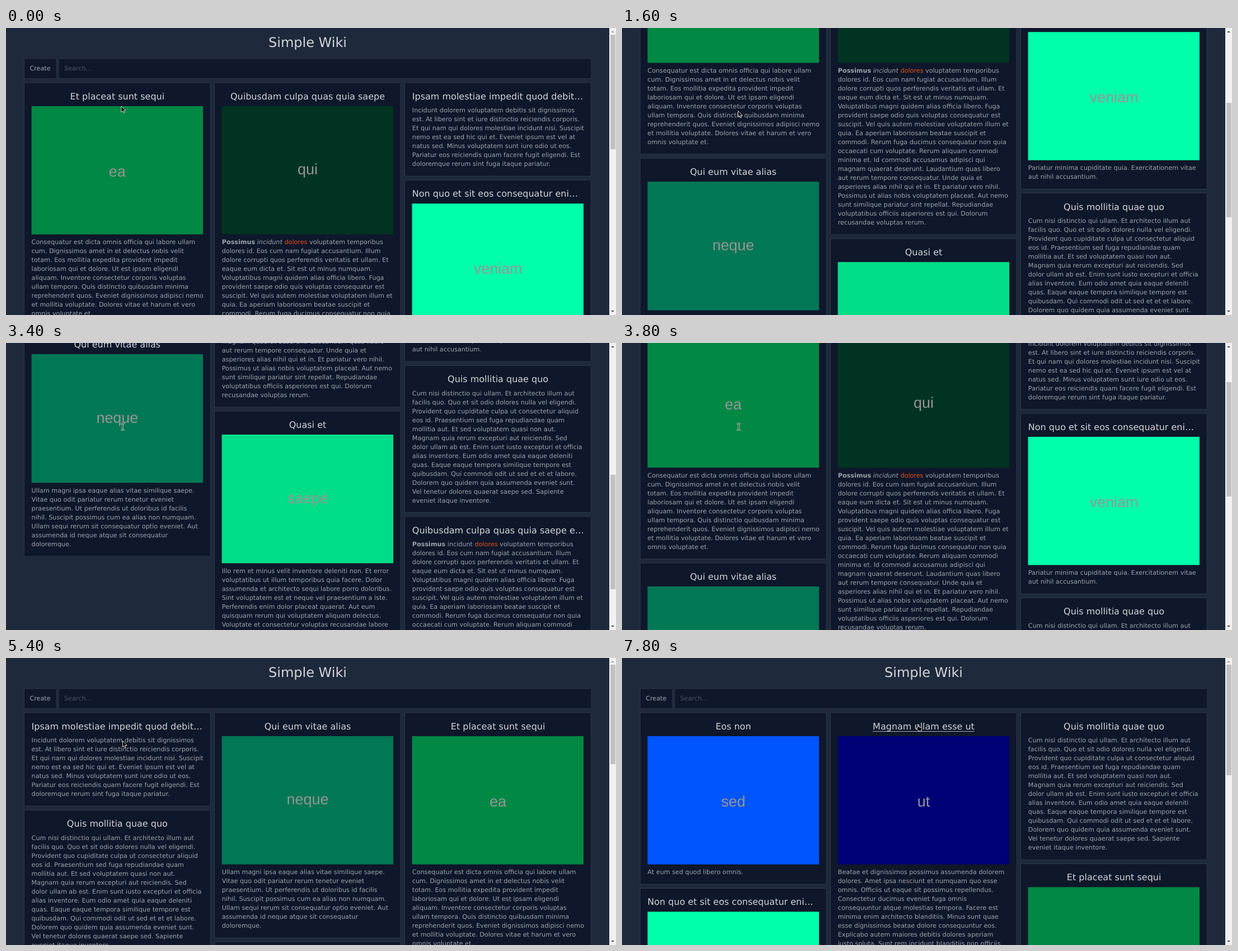
Recreate the animation shown at these times as an HTML page. Size 1090x514 px, loop 8 s.

```html
<!DOCTYPE html>
<html lang="en">
<head>
<meta charset="utf-8">
<title>Simple Wiki</title>
<style>
html, body { margin: 0; width: 100%; height: 100%; overflow: hidden; background: #1e293b; }
body { position: relative; }
/* the page is laid out at full size and shown at 80% */
#view {
  position: absolute; left: 0; top: 0; width: 1347.5px; height: 642.5px;
  transform: scale(.8); transform-origin: 0 0; color: #9ca3af;
  font: 14px/20px "DejaVu Sans", sans-serif;
  text-rendering: geometricPrecision;
}
#page { position: absolute; left: 0; top: 0; width: 100%; height: 1537px; }
h1, h2, p { margin: 0; font-weight: 400; white-space: pre; }
h1 {
  position: absolute; top: 16px; width: 100%;
  font-size: 30px; line-height: 36px; text-align: center; color: #d1d5db;
}
.box { background: #0f172a; border: 1px solid #334155; box-sizing: border-box; }
.bar { position: absolute; top: 68px; height: 46px; line-height: 44px; padding-left: 12px; }
.create { left: 40px; width: 73px; }
.search { left: 117px; width: 1190.5px; color: #4b5563; }
.scene { position: absolute; left: 40px; top: 122px; display: flex; gap: 8px; }
.col { width: 417.17px; }
.card { padding: 16px; margin-bottom: 8px; overflow: hidden; }
h2 {
  font-size: 20px; line-height: 28px; margin-bottom: 8px;
  text-align: center; color: #d1d5db;
}
h2.cut { text-align: left; }
h2.hover { text-decoration: underline 1px; text-underline-offset: 4px; text-decoration-skip-ink: none; }
.pic {
  height: 287.4px; margin-bottom: 8px; text-align: center; color: #969696;
  font: 33.7px/287.4px "Liberation Sans", Arial, sans-serif;
}
.pic span { position: relative; top: 3px; }
.pic .low { top: -.7px; }
.link { color: #e2531a; }
#scroll { position: absolute; left: 1078px; top: 0; width: 12px; height: 514px; background: #f1f1f1; }
#thumb { position: absolute; left: 1.5px; width: 9px; background: #c1c1c1; }
#scroll svg, #cursor { position: absolute; left: 0; top: 0; overflow: visible; }
</style>
</head>
<body>
<div id="view">
  <div id="page">
    <h1>Simple Wiki</h1>
    <div class="box bar create">Create</div>
    <div class="box bar search">Search...</div>
  </div>
</div>
<div id="scroll">
  <div id="thumb"></div>
  <svg width="12" height="514">
    <path id="up" d="M3 8L6 5L9 8Z"/>
    <path d="M3 506L6 509L9 506Z" fill="#505050"/>
  </svg>
</div>
<svg id="cursor" width="16" height="16">
  <path id="arrow" d="M.5 .5V11.3L3 9.1L4.7 12.8L6.3 12.1L4.7 8.5H8.2Z" stroke="#fff" stroke-width=".8"/>
  <g id="beam" fill="none">
    <path d="M-3 -5.5H-1L0 -4.7L1 -5.5H3M0 -4.7V4.7M-3 5.5H-1L0 4.7L1 5.5H3" stroke="#fff" stroke-width="2.2"/>
    <path d="M-2.5 -5.5H-1L0 -4.7L1 -5.5H2.5M0 -4.7V4.7M-2.5 5.5H-1L0 4.7L1 5.5H2.5" stroke="#000" stroke-width=".9"/>
  </g>
  <path id="hand" d="M3 8V1.5Q4 0 5 1.5V5.3L10 6.6Q11 7 10.8 8.2L10 11.5V13H4.5V11.8L1 8.6Q1.4 7.2 3 8Z" stroke="#fff" stroke-width=".9"/>
</svg>
<script>
const $ = id => document.getElementById(id);

const possimus = first => `<b>Possimus</b> ${first} <span class="link">dolores</span> voluptatem temporibus
dolores id. Eos cum nam fugiat accusantium. Illum
dolore corrupti quos perferendis veritatis et ullam. Et
eaque eum dicta et. Sit est ut minus numquam.
Voluptatibus magni quidem alias officia libero. Fuga
provident saepe odio quis voluptas consequatur est
suscipit. Vel quis autem molestiae voluptatem illum et
quia. Ea aperiam laboriosam beatae suscipit et
commodi. Rerum fuga ducimus consequatur non quia
occaecati cum voluptate. Rerum aliquam commodi
minima et. Id commodi accusamus adipisci qui
magnam quaerat deserunt. Laudantium quas libero
aut rerum tempore consequatur. Unde quia et
asperiores alias nihil qui et in. Et pariatur vero nihil.
Possimus ut alias nobis voluptatem placeat. Aut nemo
sunt similique pariatur sint repellat. Repudiandae
voluptatibus officiis asperiores est qui. Dolorum
recusandae voluptas rerum.`;

// title, text, picture word, picture colour
const cards = {
  et: ["Et placeat sunt sequi", `Consequatur est dicta omnis officia qui labore ullam
cum. Dignissimos amet in et delectus nobis velit
totam. Eos mollitia expedita provident impedit
laboriosam qui et dolore. Ut est ipsam eligendi
aliquam. Inventore consectetur corporis voluptas
ullam tempora. Quis distinctio quibusdam minima
reprehenderit quos. Eveniet dignissimos adipisci nemo
et mollitia voluptate. Dolores vitae et harum et vero
omnis voluptate et.`, "ea", "#008844"],
  culpa: ["Quibusdam culpa quas quia saepe", possimus("<i>incidunt</i>"), "qui", "#003322"],
  culpaLong: ["Quibusdam culpa quas quia saepe e…", possimus("incidunt")],
  ipsam: ["Ipsam molestiae impedit quod debit…", `Incidunt dolorem voluptatem debitis sit dignissimos
est. At libero sint et iure distinctio reiciendis corporis.
Et qui nam qui dolores molestiae incidunt nisi. Suscipit
nemo est ea sed hic qui et. Eveniet ipsum est vel at
natus sed. Minus voluptatem sunt iure odio ut eos.
Pariatur eos reiciendis quam facere fugit eligendi. Est
doloremque rerum sint fuga itaque pariatur.`],
  non: ["Non quo et sit eos consequatur eni…", `Pariatur minima cupiditate quia. Exercitationem vitae
aut nihil accusantium.`, "veniam", "#00ffaa"],
  quis: ["Quis mollitia quae quo", `Cum nisi distinctio qui ullam. Et architecto illum aut
facilis quo. Quo et sit odio dolores nulla vel eligendi.
Provident quo cupiditate culpa ut consectetur aliquid
eos id. Praesentium sed fuga repudiandae quam
mollitia aut. Et sed voluptatem quasi non aut.
Magnam quia rerum excepturi aut reiciendis. Sed
dolor ullam ab est. Enim sunt iusto excepturi et officia
alias inventore. Eum odio amet quia eaque deleniti
quas. Eaque eaque tempora similique tempore est
quibusdam. Qui commodi odit ut sed et et et labore.
Dolorem quo quidem quia assumenda eveniet sunt.
Vel tenetur dolores quaerat saepe sed. Sapiente
eveniet itaque inventore.`],
  qui: ["Qui eum vitae alias", `Ullam magni ipsa eaque alias vitae similique saepe.
Vitae quo odit pariatur rerum tenetur eveniet
praesentium. Ut perferendis ut doloribus id facilis
nihil. Suscipit possimus cum ea alias non numquam.
Ullam sequi rerum sit consequatur optio eveniet. Aut
assumenda id neque atque sit consequatur
doloremque.`, "neque", "#007755"],
  quasi: ["Quasi et", `Illo rem et minus velit inventore deleniti non. Et error
voluptatibus ut illum temporibus quia facere. Dolor
assumenda et architecto sequi labore porro doloribus.
Sint voluptatem est et neque vel praesentium a iste.
Perferendis enim dolor placeat quaerat. Aut eum
quisquam rerum qui voluptatem aliquam delectus.
Voluptate et consectetur voluptas recusandae labore
et. Sit quia maxime ducimus.`, "saepe", "#00dd88"],
  eos: ["Eos non", "At eum sed quod libero omnis.", "sed", "#0055ff"],
  magnam: ["Magnam ullam esse ut", `Beatae et dignissimos possimus assumenda dolorem
dolores. Amet ipsa nesciunt et numquam quo esse
omnis. Officiis ut eaque sit possimus repellendus.
Consectetur ducimus eveniet fuga omnis
consequuntur atque molestias tempora. Facere est
minima enim architecto blanditiis. Minus sunt quae
esse dignissimos beatae dolore consequuntur eos.
Explicabo autem maiores debitis dolores aperiam
iusto soluta. Sunt rem incidunt blanditiis non officiis`, "ut", "#000077"]
};

const scenes = [
  { from: 0, height: 1537, cols: ["et qui", "culpa quasi", "ipsam non quis culpaLong"] },
  { from: 5400, height: 1769, cols: ["ipsam quis", "qui quasi", "et"] },
  { from: 6600, height: 1590, cols: ["eos non", "magnam", "quis et"] }
];

function cardHTML(key) {
  const [title, text, word, color] = cards[key];
  const pic = word ? `<div class="pic" style="background:${color}"><span class="${/[pq]/.test(word) ? "low" : ""}">${word}</span></div>` : "";
  return `<div class="box card"><h2 class="${title.endsWith("…") ? "cut" : ""} ${key}">${title}</h2>${pic}<p>${text}</p></div>`;
}

for (const s of scenes) {
  s.el = document.createElement("div");
  s.el.className = "scene";
  s.el.innerHTML = s.cols.map(c => `<div class="col">${c.split(" ").map(cardHTML).join("")}</div>`).join("");
  $("page").append(s.el);
}
const hoverTitle = document.querySelector("h2.magnam");

// [time, value]; scroll is in page pixels, the cursor in stage pixels
const scrollKeys = [[1000, 0], [1100, 38], [1600, 384], [1900, 586], [2100, 586], [2200, 628],
  [2400, 852], [2800, 852], [2900, 894], [3200, 894], [3300, 832], [3400, 703], [3800, 183],
  [3900, 96], [4000, 96], [4200, 42], [4300, 42], [4500, 0]];
const xKeys = [[1000, 205.5], [1100, 207], [1900, 207], [2000, 208], [7300, 208], [7400, 230],
  [7500, 310], [7600, 410], [7700, 500], [7800, 525]];
const yKeys = [[1000, 139.5], [1100, 148], [7400, 148], [7600, 142], [7700, 134], [7800, 118]];

function at(keys, t) {
  const i = keys.findIndex(k => k[0] >= t);
  if (i < 0) return keys[keys.length - 1][1];
  if (i === 0) return keys[0][1];
  const [t0, a] = keys[i - 1], [t1, b] = keys[i];
  return a + (b - a) * (t - t0) / (t1 - t0);
}

const show = (el, on) => { el.style.visibility = on ? "visible" : "hidden"; };

function draw(now) {
  const t = Math.floor(now % 8000 / 100) * 100;
  const scene = scenes.filter(s => t >= s.from).pop();
  const y = Math.round(at(scrollKeys, t));
  const track = 490 / scene.height;
  for (const s of scenes) show(s.el, s === scene);
  $("page").style.top = -y + "px";
  $("thumb").style.top = 12 + y * track + "px";
  $("thumb").style.height = 642.5 * track + "px";
  $("up").setAttribute("fill", y > 0 ? "#505050" : "#a3a3a3");

  const beam = t >= 2400 && t < 4100, hand = t >= 7800;
  show($("beam"), beam);
  show($("hand"), hand);
  show($("arrow"), !beam && !hand);
  hoverTitle.classList.toggle("hover", hand);
  const [cx, cy] = beam ? [208.5, 150] : [at(xKeys, t), at(yKeys, t)];
  $("cursor").style.transform = `translate(${cx}px, ${cy}px)`;
}

const start = performance.now();
function tick() {
  draw(performance.now() - start);
  requestAnimationFrame(tick);
}
tick();
</script>
</body>
</html>
```
